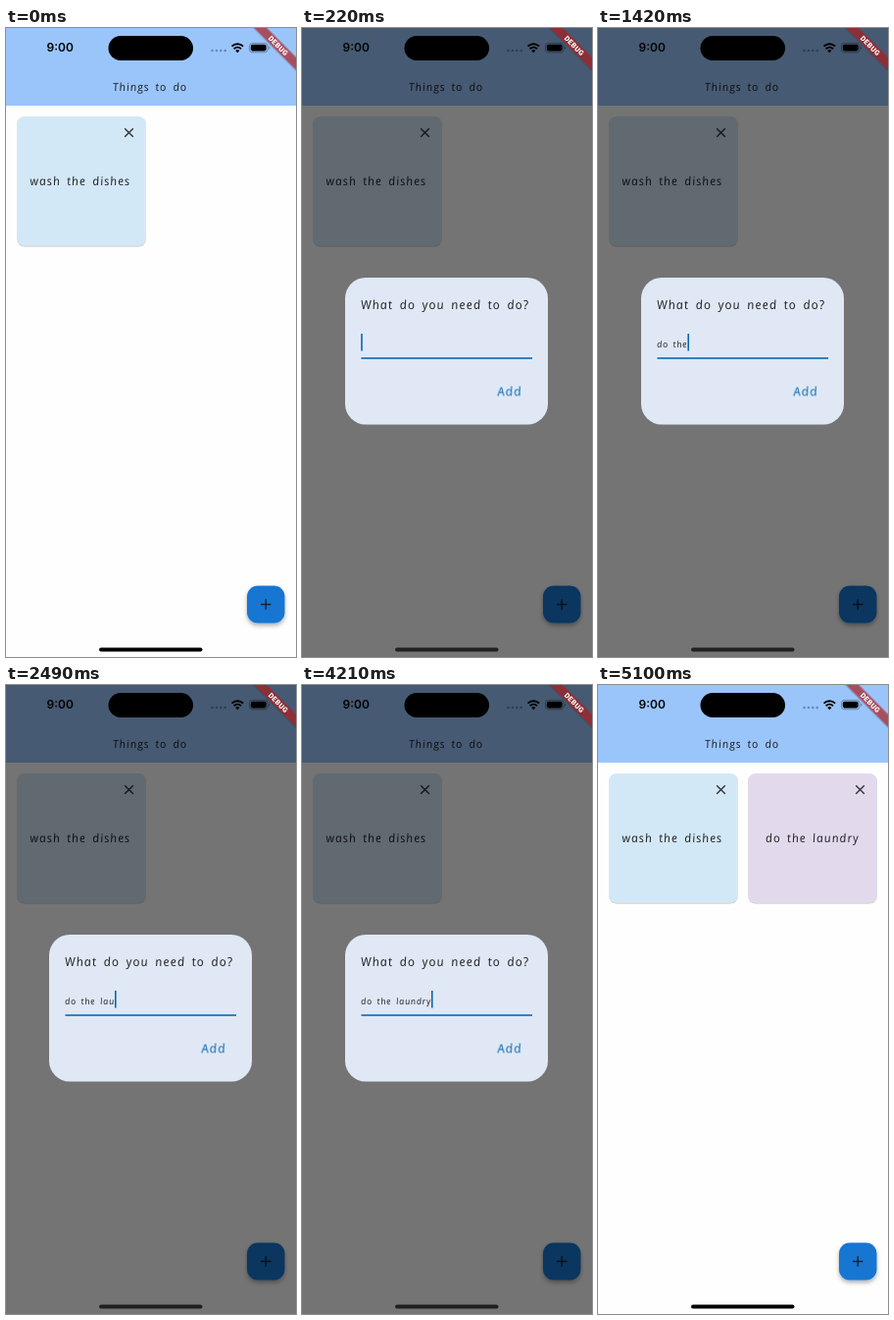
An HTML page for the animation above (5.21 s loop, 296x640 px).

```html
<!DOCTYPE html>
<html lang="en">
<head>
<meta charset="utf-8">
<title>Things to do</title>
<style>
  html, body { margin: 0; width: 100%; height: 100%; overflow: hidden; background: #fefefe; }
  svg { display: block; width: 100%; height: 100%; }

  /* An upright-skewed italic gives the round, handwritten letter forms. */
  .hand text {
    font-family: "Open Sans", "Noto Sans", sans-serif;
    font-style: italic;
    letter-spacing: .08em;
    word-spacing: .2em;
    white-space: pre;
    fill: #202226;
  }
  .s9 { font-size: 9px; }
  .s11 { font-size: 11.3px; }
  .s12 { font-size: 12px; }
  .s125 { font-size: 12.5px; }
  .hand .add { font-size: 13px; fill: #0a68b0; }

  #dim, #dialog, #second, #thin, #thick, #press, #home {
    animation: 5210ms step-end infinite;
  }
  #dim { animation-name: dim; }
  #dialog { animation-name: dialog; }
  #second { animation-name: second; }
  #thin { animation-name: thin; }
  #thick { animation-name: thick; }
  #press { animation-name: second; }
  #home { animation-name: home; }

  @keyframes dim {
    0%, 97.88%, 100% { opacity: 0; }
    2.11% { opacity: .2; }
    4.22% { opacity: .54; }
    82.91% { opacity: .07; }
  }
  @keyframes dialog {
    0%, 97.88%, 100% { opacity: 0; }
    2.11% { opacity: .42; }
    4.22% { opacity: 1; }
    82.91% { opacity: .14; }
  }
  @keyframes second {
    0% { opacity: 0; }
    82.91%, 100% { opacity: 1; }
  }
  @keyframes thin {
    0% { opacity: 1; }
    4.22%, 100% { opacity: 0; }
  }
  @keyframes thick {
    0% { opacity: 0; }
    4.22%, 100% { opacity: 1; }
  }
  @keyframes home {
    0%, 82.91%, 100% { opacity: 1; }
    4.22% { opacity: .72; }
  }
</style>
</head>
<body>
<svg viewBox="0 0 296 640" preserveAspectRatio="none">
  <defs>
    <filter id="soft" x="-30%" y="-30%" width="160%" height="170%">
      <feDropShadow dx="0" dy="2.5" stdDeviation="2.2" flood-color="#000" flood-opacity=".32"/>
    </filter>
    <filter id="low" x="-5%" y="-5%" width="110%" height="110%">
      <feDropShadow dx="0" dy=".9" stdDeviation=".7" flood-color="#000" flood-opacity=".28"/>
    </filter>
    <g id="close" stroke="#303438" stroke-width="1.4">
      <path d="M121.2 102.2l8.6 8.6M129.8 102.2l-8.6 8.6"/>
    </g>
  </defs>

  <rect width="296" height="640" fill="#fefefe"/>
  <rect width="296" height="79" fill="#9ac5fb"/>

  <g class="hand">
    <text class="s11" transform="translate(109.5 64) skewX(9)">Things to do</text>
    <rect x="11" y="90" width="132" height="131.5" rx="8" fill="#d3e8f6" filter="url(#low)"/>
    <use href="#close"/>
    <text class="s12" transform="translate(25 160) skewX(9)">wash the dishes</text>
    <g id="second">
      <rect x="153" y="90" width="132" height="131.5" rx="8" fill="#e3d9ec" filter="url(#low)"/>
      <use href="#close" x="142"/>
      <text class="s12" transform="translate(171.5 160) skewX(9)">do the laundry</text>
    </g>
  </g>

  <rect x="246" y="567.5" width="38.5" height="38" rx="11" fill="#1976d2" filter="url(#soft)"/>
  <path d="M260 586.5h10.4M265.2 581.3v10.4" stroke="#10233a" stroke-width="1.4"/>

  <rect id="dim" width="296" height="640"/>

  <g id="dialog" class="hand">
    <rect x="44" y="254" width="207" height="149.5" rx="21" fill="#e0e8f5"/>
    <text class="s125" transform="translate(60.5 286) skewX(9)">What do you need to do?</text>
    <text id="entry" class="s9" transform="translate(60.5 324.5) skewX(9)"></text>
    <rect id="caret" x="60.2" y="311" width="1.6" height="17.5" fill="#0a68b0"/>
    <rect id="thin" x="60.5" y="335.6" width="174.5" height=".9" fill="#42474e"/>
    <rect id="thick" x="60.5" y="335.2" width="174.5" height="1.6" fill="#0a68b0"/>
    <rect id="press" x="190.5" y="352.5" width="45" height="35" rx="17.5" fill="#a6adba"/>
    <text class="add" transform="translate(200 374.5) skewX(9)">Add</text>
  </g>

  <g id="status">
    <text x="41.5" y="24.3" font-family="Inter, sans-serif" font-size="12" font-weight="600">9:00</text>
    <rect x="104.5" y="8" width="86.5" height="25" rx="12.5"/>
    <path d="M210.5 23h14" stroke="#000" stroke-opacity=".3" stroke-width="2.6" stroke-linecap="round" stroke-dasharray="0 4.4"/>
    <g fill="none" stroke="#000" stroke-width="1.9">
      <path d="M230.5 18.6a8.4 8.4 0 0 1 11.6 0"/>
      <path d="M232.6 21.2a5.4 5.4 0 0 1 7.4 0"/>
    </g>
    <path d="M236.3 25.2l-2.1-2.2a3 3 0 0 1 4.2 0z"/>
    <rect x="248.4" y="15.4" width="18.6" height="9.4" rx="3" fill="none" stroke="#000" stroke-opacity=".4" stroke-width=".8"/>
    <rect x="249.8" y="16.8" width="15.8" height="6.6" rx="1.8"/>
    <path d="M268.3 18.4v3.4a1.9 1.9 0 0 0 0-3.4" fill-opacity=".45"/>
    <rect id="home" x="95" y="630.5" width="105.5" height="4" rx="2"/>
  </g>

  <g transform="translate(278 18.1) rotate(45)">
    <rect x="-32" y="-4.6" width="64" height="9.2" fill="#b71c1c" fill-opacity=".63" filter="url(#low)"/>
    <text y="2.6" text-anchor="middle" font-family="Roboto, sans-serif" font-size="7.3" font-weight="900" letter-spacing=".4" fill="#fff">DEBUG</text>
  </g>
</svg>
<script>
  const phrase = "do the laundry";
  const keyTimes = [670, 780, 890, 1000, 1210, 1310, 1420,
                    2180, 2290, 2390, 2490, 2600, 2700, 2810];
  const caretGaps = [[1970, 2180], [3140, 3250], [3780, 4000], [4320, 5210]];

  const entry = document.getElementById("entry");
  const caret = document.getElementById("caret");
  const clock = document.getElementById("dim").getAnimations()[0];

  function draw() {
    const t = ((clock.currentTime || 0) + 1) % 5210;
    const typed = phrase.slice(0, keyTimes.filter(k => k <= t).length);
    if (entry.textContent !== typed) entry.textContent = typed;
    const width = typed ? entry.getComputedTextLength() : 0;
    caret.setAttribute("x", 60.2 + width);
    caret.style.opacity = caretGaps.some(([from, to]) => t >= from && t < to) ? 0 : 1;
    requestAnimationFrame(draw);
  }
  draw();
</script>
</body>
</html>
```
